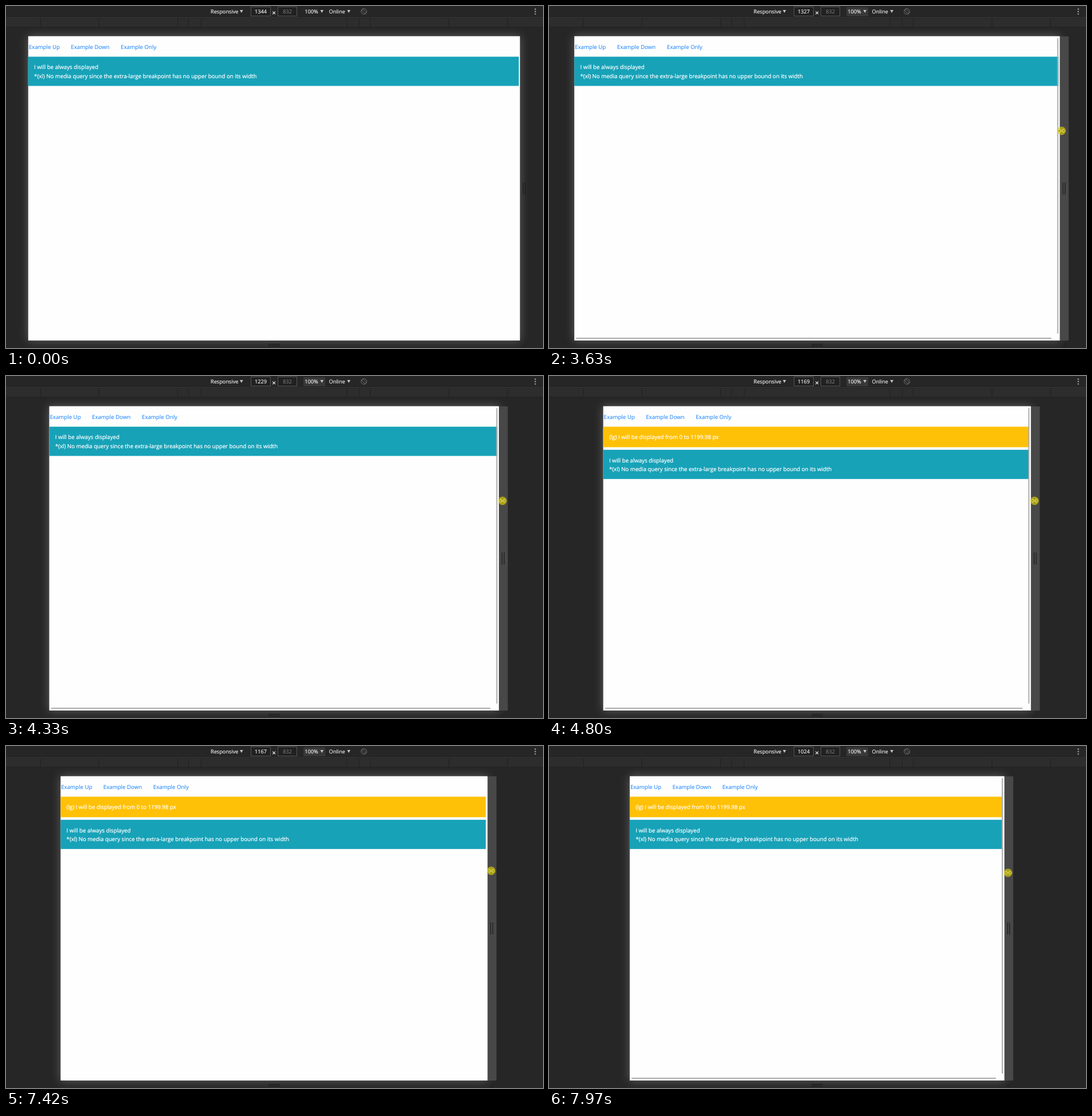
An HTML page for the animation above (8 s loop, 937x597 px).

```html
<!DOCTYPE html>
<html lang="en">
<head>
<meta charset="utf-8">
<title>Responsive breakpoints</title>
<style>
  html, body { margin: 0; width: 100%; height: 100%; overflow: hidden; background: #262626; }
  svg { display: block; width: 937px; height: 597px; }
  text { font-family: "Open Sans", "Noto Sans", sans-serif; text-rendering: geometricPrecision; }
  .bar text { font-size: 9.2px; fill: #f4f4f4; stroke: #f4f4f4; stroke-width: .15; }
  .bar .dim { fill: #858585; stroke: none; }
  .page text { font-size: 9.69px; fill: #fff; stroke: #fff; stroke-width: .22; }
  .page .link { fill: #0a7cfb; stroke: none; }
  .thin { fill: none; stroke: #757575; stroke-width: .9; }
  .grip { fill: none; stroke: #161616; }
</style>
</head>
<body>
<svg viewBox="0 0 937 597">
  <defs>
    <filter id="blur" filterUnits="userSpaceOnUse" x="-40" y="0" width="1020" height="660">
      <feGaussianBlur stdDeviation="8"/>
    </filter>
    <clipPath id="below"><rect y="37" width="937" height="560"/></clipPath>
  </defs>

  <rect width="937" height="597" fill="#262626"/>
  <g clip-path="url(#below)">
    <rect id="glow" y="53" height="531" fill="#606060" filter="url(#blur)"/>
  </g>

  <g class="bar">
    <rect y="20" width="937" height="1" fill="#3b3b3b"/>
    <rect y="21" width="937" height="1" fill="#242424"/>
    <rect y="22" width="937" height="14" fill="#2d2d2d"/>
    <rect y="36" width="937" height="1" fill="#232323"/>
    <path id="ticks" stroke="#212121"/>
    <rect id="zoom" x="519" y="2" width="38" height="16" fill="#383838"/>
    <text x="357" y="13">Responsive</text>
    <text x="521.3" y="13">100%</text>
    <text x="563.5" y="13">Online</text>
    <path d="M408 7h5.6l-2.8 5zM548.4 7h5.6l-2.8 5zM595.3 7h5.6l-2.8 5z" fill="#c4c4c4"/>
    <g fill="#212121" stroke="#555">
      <rect x="427.5" y="1.5" width="34" height="16"/>
      <rect x="474.5" y="1.5" width="33" height="16"/>
    </g>
    <text id="size" x="444.6" y="13" text-anchor="middle"></text>
    <text class="dim" x="490.8" y="13" text-anchor="middle">832</text>
    <path d="M465.2 9.6l4.8 4.8m0-4.8l-4.8 4.8" stroke="#eee" stroke-width="1.2"/>
    <circle class="thin" cx="624.5" cy="9.5" r="5"/>
    <rect class="thin" x="622.7" y="5.7" width="3.6" height="7.6" transform="rotate(-45 624.5 9.5)"/>
    <g fill="#a8a8a8">
      <circle cx="923.5" cy="5.5" r="1.2"/>
      <circle cx="923.5" cy="9.7" r="1.2"/>
      <circle cx="923.5" cy="13.9" r="1.2"/>
    </g>
  </g>

  <path class="grip" d="M458 590.5h20M458 593.5h20"/>
  <g id="side">
    <rect id="strip" y="53" width="15.5" height="531" fill="#484848"/>
    <path class="grip" d="M5.5 308v21M9.2 308v21"/>
    <path class="grip" d="M3 596l8-8M7 596l4-4" opacity=".6"/>
  </g>

  <g class="page" id="page">
    <rect id="sheet" y="52.7" height="531.2" fill="#fefefe"/>
    <text class="link" x="1" y="74.7">Example Up</text>
    <text class="link" x="74.6" y="74.7">Example Down</text>
    <text class="link" x="161.6" y="74.7">Example Only</text>
    <g id="warn">
      <rect class="box" y="88.5" height="35.8" fill="#ffc107"/>
      <text x="10.3" y="110.3">(lg) I will be displayed from 0 to 1199.98 px</text>
    </g>
    <g id="info">
      <rect class="box" y="88.5" height="51" fill="#17a2b8"/>
      <text x="10.3" y="110.3">I will be always displayed</text>
      <text x="10.3" y="125.6">*(xl) No media query since the extra-large breakpoint has no upper bound on its width</text>
    </g>
    <g id="scroll" fill="#acacac">
      <rect id="vbar" y="56" width="2" height="516" rx="1"/>
      <rect id="hbar" x="3" y="579" height="2" rx="1"/>
    </g>
  </g>

  <g id="cursor">
    <path id="arrow" d="M0 0v11l2.6-2.4 1.7 3.8 1.7-.8-1.7-3.6h3.5z" fill="#fff" stroke="#000" stroke-width=".6"/>
    <path id="resize" d="M-6.3 0l3.6-3.2v2.3h5.4v-2.3l3.6 3.2-3.6 3.2v-2.3h-5.4v2.3z" fill="#222" stroke="#fff"/>
    <circle id="press" r="7.4" fill="#dccf00" fill-opacity=".64"/>
  </g>
</svg>
<script>
const LOOP = 8000, STEP = 77.6;             // ms
const MID = 467.75, SCALE = 0.6384, FULL = 1344;
const ENTER = 520, PRESS = 3070, DRAG = 3470, DRAG_AGAIN = 7421;

// [time, viewport width]
const widths = [[3390, FULL], [3625, 1327], [4323, 1229], [4790, 1169], [4944, 1167],
  [DRAG_AGAIN, 1167], [7970, 1024]];
// [time, distance of the pointer from the page's right edge]
const gaps = [[ENTER, 39], [1050, 3], [1520, 8.7], [3390, 8.7], [3625, 3], [4323, 6.3]];

const $ = id => document.getElementById(id);
const set = (el, attrs) => { for (const k in attrs) el.setAttribute(k, attrs[k]); };
const show = (el, on) => set(el, { visibility: on ? 'visible' : 'hidden' });
const clamp = v => Math.max(0, Math.min(1, v));

function track(keys, t) {
  const next = keys.findIndex(k => k[0] >= t);
  if (next < 0) return keys[keys.length - 1][1];
  if (next === 0) return keys[0][1];
  const [t0, a] = keys[next - 1], [t1, b] = keys[next];
  return a + (b - a) * (t - t0) / (t1 - t0);
}

function barOpacity(t) {
  if (t < DRAG || t > DRAG_AGAIN) return t < DRAG ? 0 : 1;
  return clamp((5500 - t) / 300);
}

function drawPage(t, size, left, w) {
  const small = size < 1200;
  $('size').textContent = size;
  set($('page'), { transform: `translate(${left} 0)` });
  set($('sheet'), { width: w });
  set($('glow'), { x: left, width: w });
  set($('side'), { transform: `translate(${left + w} 0)` });
  const boxWidth = w - 2 - (FULL - size) * 0.0062;
  document.querySelectorAll('.box').forEach(box => set(box, { width: boxWidth }));
  show($('warn'), small);
  set($('info'), { transform: `translate(0 ${small ? 40.3 : 0})` });
  set($('scroll'), { opacity: barOpacity(t) });
  set($('vbar'), { x: w - 4.6 });
  set($('hbar'), { width: w - 17.7 });
}

function drawCursor(t, edge) {
  const gap = track(gaps, t);
  const y = 217.8 + 8 * clamp(1 - (t - ENTER) / 1000) + 3.5 * clamp((t - 7340) / 630);
  const inside = t >= ENTER, over = inside && gap < 15.5;
  set($('cursor'), { transform: `translate(${edge + gap} ${y})` });
  show($('arrow'), inside && !over);
  show($('resize'), over);
  show($('strip'), over);
}

function draw(time) {
  const t = time % LOOP;
  // the picture refreshes on a fixed grid of steps
  const held = DRAG + STEP * Math.floor((t + 4 - DRAG) / STEP);
  const size = Math.round(track(widths, held));
  const w = size * SCALE, left = MID - w / 2;
  drawPage(held, size, left, w);
  drawCursor(held, left + w);
  show($('press'), t >= PRESS);
  show($('zoom'), t >= PRESS);
}

set($('ticks'), { d: [127, 149, 168, 305.5, 407.5]
  .map(d => `M${467.5 - d} 22v14M${467.5 + d} 22v14`).join('') });

const start = performance.now();
function tick() {
  draw(performance.now() - start);
  requestAnimationFrame(tick);
}
tick();
</script>
</body>
</html>
```
